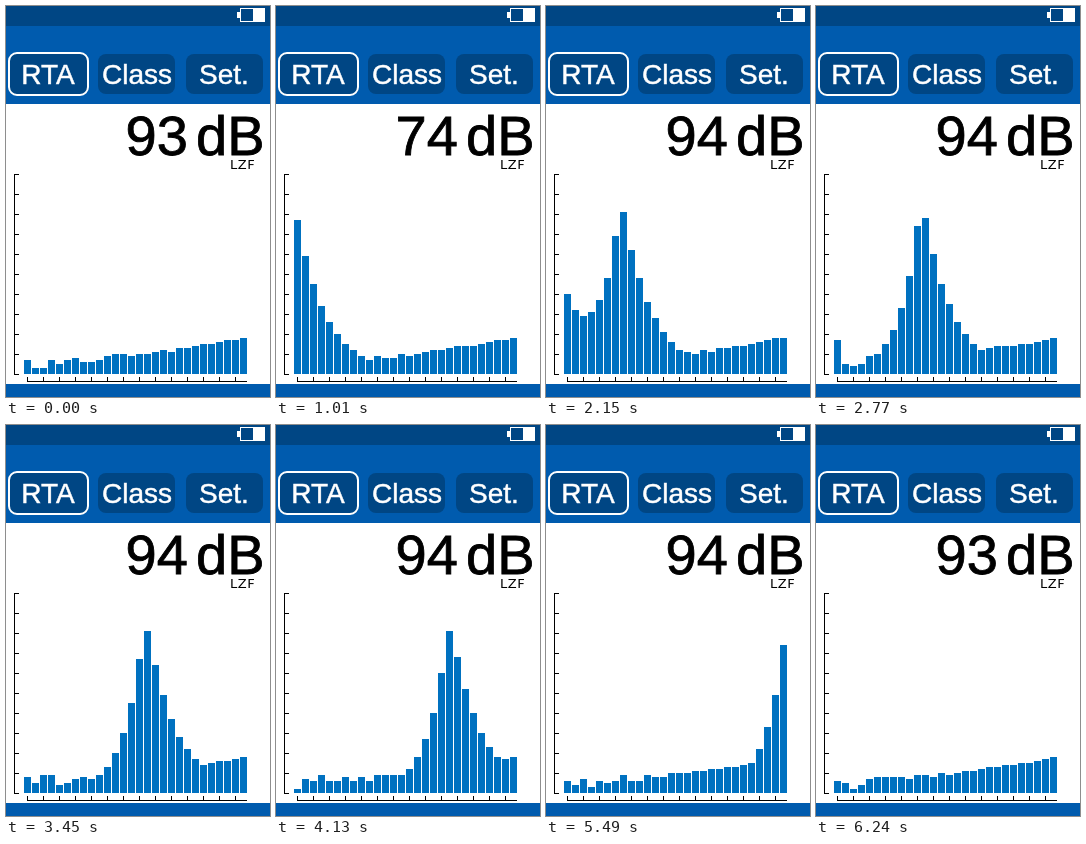
Recreate the animation shown at these times as an HTML page. Size 264 by 391 pixels, loop 6.31 s.

```html
<!DOCTYPE html>
<html lang="en">
<head>
<meta charset="utf-8">
<title>Sound level meter</title>
<style>
  html, body { margin: 0; width: 100%; height: 100%; overflow: hidden; background: #fff; }
  svg { display: block; width: 264px; height: 391px; }
  text { font-family: "Liberation Sans", Arial, sans-serif; }
  .head { fill: #005bae; }
  .dark { fill: #004684; }
  .tab { font-size: 28px; fill: #fff; stroke: #fff; stroke-width: 0.5; text-anchor: middle; }
  .level { font-size: 56px; stroke: #000; stroke-width: 0.8; }
  .mode { font: 13px "DejaVu Sans", sans-serif; letter-spacing: 0.5px; }
  .axis { fill: none; stroke: #000; }
  .bars { fill: #0071c0; }
  .crisp { shape-rendering: crispEdges; }
</style>
</head>
<body>
<svg viewBox="0 0 264 391">
  <g class="crisp">
    <rect class="head" width="264" height="98"/>
    <rect class="dark" width="264" height="20"/>
    <rect class="head" y="378" width="264" height="13"/>
    <path fill="#fff" d="M231 6h3v-4h25v14h-25v-4h-3z"/>
    <rect class="dark" x="235" y="3" width="12" height="12"/>
  </g>
  <rect class="dark" x="3" y="47" width="79" height="42" rx="8" stroke="#fff" stroke-width="2"/>
  <rect class="dark" x="92" y="48" width="77" height="40" rx="8"/>
  <rect class="dark" x="180" y="48" width="77" height="40" rx="8"/>
  <text class="tab" x="42" y="78">RTA</text>
  <text class="tab" x="131" y="78">Class</text>
  <text class="tab" x="218" y="78">Set.</text>
  <text class="level" id="level" x="119.5" y="149">93</text>
  <text class="level" x="190" y="149">dB</text>
  <text class="mode" x="224" y="163">LZF</text>
  <path class="axis crisp" id="axis"/>
  <path class="bars crisp" id="bars"/>
</svg>
<script>
const LOOP = 6310, TICK = 68, BANDS = 28, BASE = 368, PEAK = 162;
const bars = document.getElementById('bars');
const level = document.getElementById('level');

let axis = 'M8.5 168V369';
for (let y = 168; y <= BASE; y += 20) axis += `M8 ${y + 0.5}h5`;
axis += 'M21 375.5H241';
for (let x = 21; x < 241; x += 16) axis += `M${x + 0.5} 371v5`;
document.getElementById('axis').setAttribute('d', axis);

// Roughly every fifth refresh brings no new data.
function lastTick(t) {
  const k = Math.floor((t - 40) / TICK);
  return (k - 0.7) % 4.85 > 3.85 ? k - 1 : k;
}

function random(a, b) {
  const v = Math.sin(a * 127.1 + b * 311.7) * 43758.5453;
  return v - Math.floor(v);
}

function floorHeight(band, tick) {
  const mean = 10.5 + 0.35 * band + 0.022 * band * band;
  const spread = 9 * Math.exp(-band / 6) + 1;
  return mean + (random(band + 1, tick) * 2 - 1) * spread;
}

// The tone climbs one band every 160 ms, with a steeper skirt behind it.
function toneHeight(band, t) {
  const d = band - (6.85 + (t - 2150) / 160);
  const skirt = d < 0 ? 197 * Math.exp(0.4 * d) : 168 * Math.exp(-0.27 * d);
  // Low bands ring on longer after the tone has passed.
  const ring = d < 0 ? PEAK + d * (12 + 4.6 * band) : 0;
  const attack = Math.max(0, 1000 - t) * 0.2;
  return Math.min(PEAK, Math.max(skirt, ring)) - attack;
}

function draw(t) {
  const tick = lastTick(t);
  const now = 50 + tick * TICK;
  let d = '';
  for (let i = 0; i < BANDS; i++) {
    const h = 2 * Math.round(Math.max(0, floorHeight(i, tick), toneHeight(i, now)) / 2);
    d += `M${18 + i * 8} ${BASE}v${-h}h7v${h}z`;
  }
  bars.setAttribute('d', d);
  level.textContent = t < 870 || t >= 5870 ? 93 : t < 1870 ? 74 : 94;
}

const began = performance.now();
function frame() {
  draw((performance.now() - began) % LOOP);
  requestAnimationFrame(frame);
}
frame();
</script>
</body>
</html>
```
